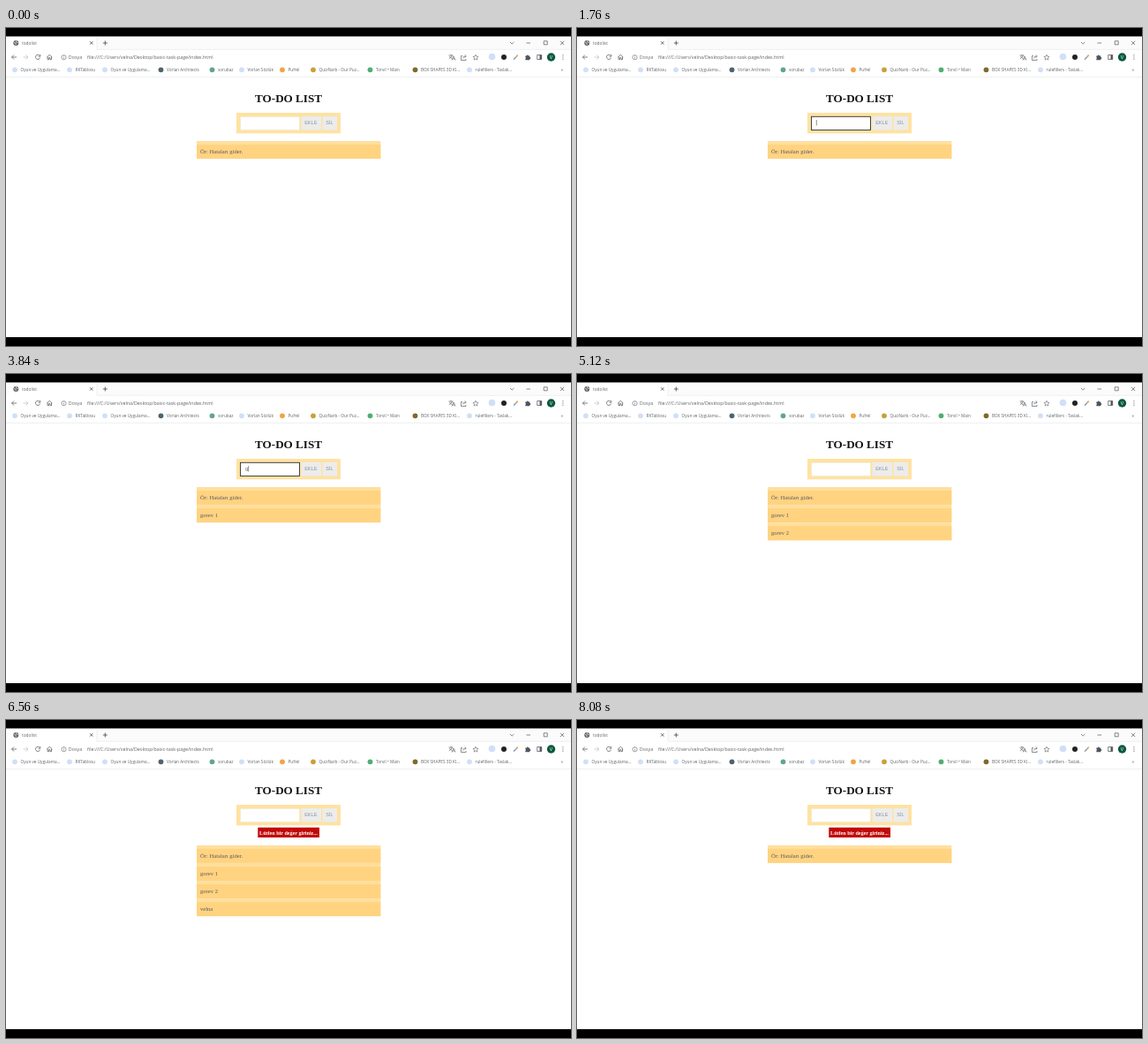
These frames come from a looping animation (640x360 px, 8.16 s). An HTML page:

```html
<!DOCTYPE html>
<html lang="tr">
<head>
<meta charset="utf-8">
<title>todolist</title>
<style>
  html, body { margin: 0; width: 100%; height: 100%; overflow: hidden; background: #fff; }
  svg { display: block; width: 640px; height: 360px; }
  .ui { font-family: "Open Sans", sans-serif; fill: #5f6368; }
  .tab { font-size: 4.8px; }
  .mark { font-size: 4.7px; }
  .url { font-size: 5.35px; }
  .sans { font-family: "Liberation Sans", sans-serif; }
  .serif { font-family: "Liberation Serif", serif; }
  .line { fill: none; stroke: #5f6368; stroke-width: .8; }
  .item text { font-size: 6.6px; fill: #5c5862; }
</style>
</head>
<body>
<svg viewBox="0 0 640 360">
  <rect width="640" height="360" fill="#fff"/>
  <g id="browser">
    <rect y="9" width="640" height="15.5" fill="#fbfbfc"/>
    <path d="M3 24.5V14q0-3 3-3h94q3 0 3 3v10.5z" fill="#fff"/>
    <path class="line" d="M103 11.5V24M103 24.3H640M0 55.5H640" style="stroke:#e9eaec;stroke-width:.7"/>

    <circle cx="11.3" cy="17" r="3" fill="#60656b"/>
    <path d="M9.2 16.2l1.8 1 .3 1.8M11.5 14.4l.2 1.5 2 .8" fill="none" stroke="#fff" stroke-width=".7"/>
    <text class="ui tab" x="18" y="18.7">todolist</text>
    <path class="line" d="M95 15.2l3.4 3.4m0-3.4L95 18.600M109.800 17h5M112.300 14.500v5" style="stroke:#444"/>
    <path class="line" d="M571 16l2.200 2 2.200-2M589.500 17h4.500M609.200 14.800h4v4h-4zM628 14.800l4.200 4.200m0-4.200L628 19" style="stroke:#555;stroke-width:.7"/>

    <path class="line" d="M12 33H6.500M9 30.500L6.500 33 9 35.500"/>
    <path class="line" d="M19.500 33H25M22.500 30.500L25 33l-2.500 2.500" style="stroke:#c2c4c7"/>
    <path class="line" d="M38.200 31.300a2.600 2.600 0 1 0 .4 2.300M38.800 30v2.200h-2.200"/>
    <path class="line" d="M46.300 33l3-2.700 3 2.700M47.100 32.500v3.200h1.500v-2h1.400v2h1.500v-3.200"/>
    <circle class="line" cx="65.500" cy="33.200" r="2.600" style="stroke-width:.6"/>
    <path class="line" d="M65.500 32.800v1.800M65.500 31.500v.6" style="stroke-width:.6"/>
    <text class="ui" x="70.800" y="35" style="font-size:5.350px">Dosya</text>
    <text class="ui url" x="92" y="35">file:///C:/Users/velna/Desktop/basic-task-page/index.html</text>

    <path class="line" d="M501.500 31h5M504 30v1M505.500 31q-.8 2.400-3.700 3.800M502.500 32q.8 1.600 2.600 2.400M505 36.500l2-4.500 2 4.500M505.800 35h2.400" style="stroke-width:.7"/>
    <path class="line" d="M517 31.500h-1.500v5h5.500v-1.500M517.500 34.500q0-2.500 3.500-2.500m-1.400-1.600L521.300 32l-1.700 1.600" style="stroke-width:.7"/>
    <path class="line" d="M532 30.200l.9 2 2.200.2-1.700 1.500.5 2.200-1.900-1.200-1.900 1.200.5-2.200-1.700-1.500 2.200-.2z" style="stroke-width:.6"/>
    <circle cx="550.500" cy="32.500" r="3.800" fill="#cfe0f7"/>
    <circle cx="564" cy="33" r="3" fill="#222"/>
    <path d="M575 35.600l2.600-2.600" stroke="#5d8fd0" stroke-width="1.200"/>
    <path d="M577.500 33l2.200-2.400" stroke="#e8a04c" stroke-width="1.700"/>
    <path d="M588.300 31.500h1.500a1 1 0 0 1 2 0h1.500v1.500a1 1 0 0 1 0 2v1.300h-5v-1.500a1 1 0 0 0 0-1.800z" fill="#50545a"/>
    <path class="line" d="M601.700 30.500h5v5h-5z"/>
    <path d="M604.500 30.500h2.200v5h-2.200z" fill="#50545a"/>
    <circle cx="617.500" cy="33" r="4.700" fill="#0b5a3c"/>
    <text class="sans" x="617.500" y="34.800" font-size="5" fill="#fff" text-anchor="middle">V</text>
    <path d="M630.400 30.200h1v1h-1zM630.400 32.500h1v1h-1zM630.400 34.800h1v1h-1z" fill="#5f6368"/>
    <text class="ui" x="628.500" y="49" font-size="5">»</text>
  </g>

  <text class="serif" x="320" y="84" font-size="13.100" font-weight="bold" text-anchor="middle" fill="#111">TO-DO LIST</text>

  <rect x="261" y="96" width="118" height="23.300" fill="#ffe2a2"/>
  <rect id="field" x="265.500" y="100.300" width="67" height="15.200" fill="#fff"/>
  <text id="typed" class="sans" x="271" y="109.200" font-size="6" fill="#777" xml:space="preserve"></text>
  <path id="caret" d="M0 104v6.500" stroke="#444" stroke-width=".6"/>
  <g class="sans" font-size="5.600" fill="#8d929b" text-anchor="middle">
    <path d="M334.500 100h22.500v15.500h-22.500zM358.500 100h16.500v15.500h-16.500z" fill="#ececec"/>
    <text x="345.300" y="109.300">EKLE</text>
    <text x="366.500" y="109.300">SİL</text>
  </g>

  <g id="error">
    <rect x="285.300" y="121.700" width="69.700" height="11.300" fill="#c20808"/>
    <text class="serif" x="320" y="129.700" font-size="6.100" font-weight="bold" fill="#fff" text-anchor="middle">Lütfen bir değer giriniz...</text>
  </g>
  <g id="list"></g>

  <path d="M0 0H640V9.500H0zM0 350H640V360H0z" fill="#000"/>
</svg>
<script>
const LOOP = 8160;
const $ = id => document.getElementById(id);

function add(parent, tag, attrs, text = '') {
  const node = document.createElementNS('http://www.w3.org/2000/svg', tag);
  for (const key in attrs) node.setAttribute(key, attrs[key]);
  node.textContent = text;
  return parent.appendChild(node);
}

// Bookmarks: icon centre, icon colour, label
[
  [10, '#cfe0f7', 'Oyun ve Uygulama...'],
  [72, '#cfe0f7', 'RKTablosu'],
  [112, '#cfe0f7', 'Oyun ve Uygulama...'],
  [175.500, '#4d6470', 'Vorlan Architects'],
  [233.500, '#62a58c', 'sorubaz'],
  [267, '#cfe0f7', 'Vorlan Sözlük'],
  [313, '#f0a445', 'Pufrel'],
  [348, '#c9a13a', 'QuizNarb - Our Puz...'],
  [412.500, '#4fae72', 'Torvil • Main'],
  [463.500, '#7d6a2c', 'BOX SHAPES 3D KI...'],
  [525, '#cfe0f7', 'rulefillers - Taslak...']
].forEach(([x, fill, label]) => {
  add($('browser'), 'circle', { cx: x, cy: 47.3, r: 2.9, fill });
  add($('browser'), 'text', { class: 'ui mark', x: x + 6.5, y: 49 }, label);
});

const tasks = ['Ör: Hataları gider.', 'gorev 1', 'gorev 2', 'velna'];
const rows = tasks.map((task, i) => {
  const row = add($('list'), 'g', { class: 'item serif' });
  const y = 128 + i * 20.1;
  add(row, 'rect', { x: 216, y, width: 208.3, height: 20.1, fill: '#ffdf9e' });
  add(row, 'rect', { x: 216, y: y + 4, width: 208.3, height: 16, fill: '#ffd380' });
  add(row, 'text', { x: 220, y: y + 14 }, task);
  return row;
});

// Each entry: focus time, key times, submit time
const entries = [
  [1760, [2400, 2560, 2720, 2800, 2960, 3000, 3040], 3520],
  [3760, [3840, 3920, 4000, 4080, 4160, 4240, 4320], 4720],
  [5600, [5680, 5840, 5920, 6000, 6080], 6480]
];
const deletions = [7360, 7600, 7840];
const errorStart = 5280;

const passed = (times, t) => times.filter(time => time <= t).length;
const show = (node, on) => node.setAttribute('visibility', on ? 'visible' : 'hidden');

function draw(t) {
  const active = entries.findIndex(([start, , end]) => t >= start && t < end);
  const focused = active >= 0;
  const text = focused ? tasks[active + 1].slice(0, passed(entries[active][1], t)) : '';
  const field = $('field');
  field.setAttribute('stroke', focused ? '#333' : '#f1e6cb');
  field.setAttribute('stroke-width', focused ? .9 : .6);
  $('typed').textContent = text;
  const caretX = 271.3 + (text ? $('typed').getComputedTextLength() : 0);
  $('caret').setAttribute('transform', `translate(${caretX} 0)`);
  show($('caret'), focused);

  const count = 1 + passed(entries.map(entry => entry[2]), t) - passed(deletions, t);
  rows.forEach((row, i) => show(row, i < count));
  const failed = t >= errorStart;
  show($('error'), failed);
  $('list').setAttribute('transform', `translate(0 ${failed ? 13.8 : 0})`);
}

const begin = performance.now();
function tick() {
  draw((performance.now() - begin) % LOOP);
  requestAnimationFrame(tick);
}
tick();
</script>
</body>
</html>
```
